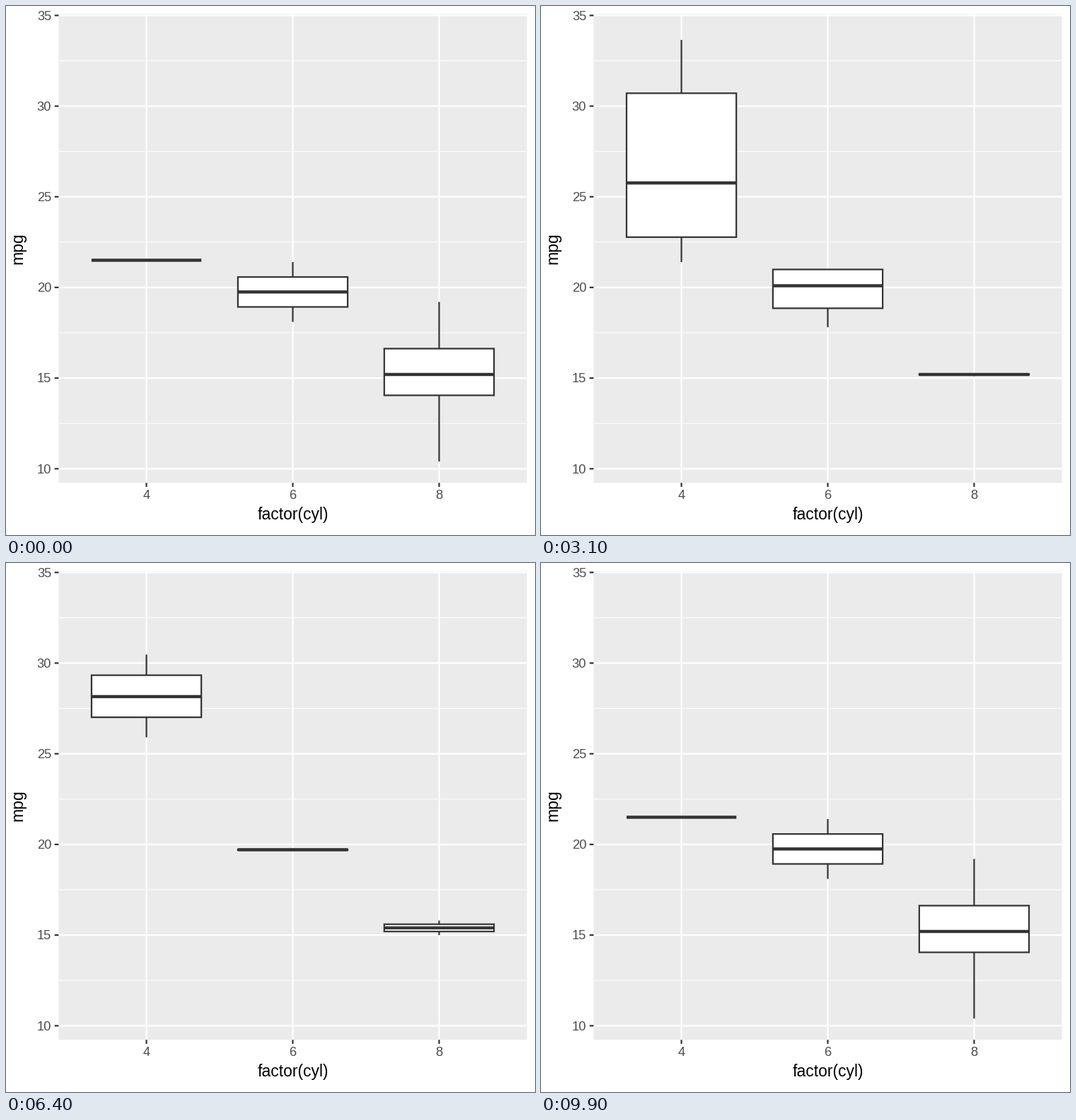
Write a matplotlib script that moves like this. It is 748 by 748 pixels and loops after 10000 ms.

```python
import math

import numpy as np
import matplotlib.pyplot as plt
from matplotlib.animation import FuncAnimation
from matplotlib.patches import Polygon, Rectangle

SIZE, DPI = 748, 136
FRAMES, INTERVAL = 100, 100
LEFT, RIGHT, TOP = 74.4, 736.6, 11.42
Y_MAX, Y_MIN, UNIT = 35.075, 9.225, 25.64
BOTTOM = TOP + (Y_MAX - Y_MIN) * UNIT
STEP = (RIGHT - LEFT) / 3.2
HALF = 0.375 * STEP
LINE = 2.22
TICK = 5.7
INK = "#333333"

# mpg values per gear, one list for each of 4, 6 and 8 cylinders
GEARS = [
    ([21.5],
     [21.4, 18.1],
     [18.7, 14.3, 16.4, 17.3, 15.2, 10.4, 10.4, 14.7, 15.5, 15.2, 13.3, 19.2]),
    ([22.8, 24.4, 22.8, 32.4, 30.4, 33.9, 27.3, 21.4],
     [21.0, 21.0, 19.2, 17.8],
     []),
    ([26.0, 30.4],
     [19.7],
     [15.8, 15.0]),
]
STATES = [[np.percentile(v, [0, 25, 50, 75, 100]) if v else None for v in gear]
          for gear in GEARS]

# Hold and transition schedule: frame -> position in the state cycle
KEY_FRAMES = [0, 11, 33, 45, 55, 66, 78, 99]
KEY_STATES = [0, 0, 1, 1, 1.5, 2, 2, 3]

plt.rcParams["font.family"] = "Liberation Sans"
fig = plt.figure(figsize=(SIZE / DPI, SIZE / DPI), dpi=DPI, facecolor="white")
ax = fig.add_axes([0, 0, 1, 1])
ax.set_xlim(0, SIZE)
ax.set_ylim(SIZE, 0)
ax.axis("off")


def pt(px):
    return px * 72 / DPI


def px_y(value):
    return TOP + (Y_MAX - value) * UNIT


def px_x(index):
    return LEFT + (index + 0.6) * STEP


def line(xs, ys, color, width, z):
    return ax.plot(xs, ys, color=color, lw=pt(width), zorder=z, snap=False,
                   solid_capstyle="butt")[0]


def label(x, y, text, px, color, **kw):
    ax.text(x, y, text, fontsize=pt(px), color=color, va="baseline",
            rotation_mode="anchor", **kw)


def draw_panel():
    ax.add_patch(Rectangle((LEFT, TOP), RIGHT - LEFT, BOTTOM - TOP,
                           fc="#EBEBEB", ec="none", zorder=0, snap=False))
    for value in np.arange(12.5, 35, 5):
        line([LEFT, RIGHT], [px_y(value)] * 2, "white", LINE / 2, 1)
    for value in range(10, 36, 5):
        y = px_y(value)
        line([LEFT, RIGHT], [y, y], "white", LINE, 2)
        line([LEFT - TICK, LEFT], [y, y], INK, LINE, 2)
        label(64.1, y + 6.3, str(value), 18.33, "#4D4D4D", ha="right")
    for i, name in enumerate("468"):
        x = px_x(i)
        line([x, x], [TOP, BOTTOM], "white", LINE, 2)
        line([x, x], [BOTTOM, BOTTOM + TICK], INK, LINE, 2)
        label(x, 697.2, name, 18.33, "#4D4D4D", ha="center")
    label(px_x(1), 726, "factor(cyl)", 22.92, "black", ha="center")
    label(23.7, (TOP + BOTTOM) / 2, "mpg", 22.92, "black", ha="center",
          rotation=90)


class Box:
    def __init__(self, index):
        self.x = px_x(index)
        self.l, self.r = self.x - HALF, self.x + HALF
        self.whiskers = [line([self.x] * 2, [0, 0], INK, LINE, 3)
                         for _ in range(2)]
        self.body = Polygon([(0, 0)] * 4, closed=True, fc="white", ec=INK,
                            lw=pt(LINE), joinstyle="miter", zorder=4,
                            snap=False)
        ax.add_patch(self.body)
        self.median = line([self.l, self.r], [0, 0], INK, 2 * LINE, 5)
        self.parts = [*self.whiskers, self.body, self.median]

    def show(self, stats, alpha):
        for part in self.parts:
            part.set_visible(stats is not None)
        if stats is None:
            return
        low, q1, mid, q3, high = map(px_y, stats)
        for whisker, ys in zip(self.whiskers, ([q3, high], [q1, low])):
            whisker.set_ydata(ys)
            whisker.set_alpha(alpha)
        self.body.set_xy([(self.l, q3), (self.l, q1), (self.r, q1),
                          (self.r, q3)])
        self.body.set_edgecolor((0.2, 0.2, 0.2, alpha))
        self.median.set_ydata([mid, mid])
        # The median is still solid on the first, barely visible step
        self.median.set_alpha(alpha if alpha > 0.01 else 1)


def blend(a, b, u):
    """Stats and line opacity: new boxes fade in, old ones shrink away."""
    if u == 0:
        return a, 1
    e = (1 - math.cos(math.pi * u)) / 2
    if a is None:
        return b, e
    if b is None:
        b = np.full(5, a[2])
    return a + (b - a) * e, 1


draw_panel()
boxes = [Box(i) for i in range(3)]


def update(frame):
    pos = round(float(np.interp(frame, KEY_FRAMES, KEY_STATES)), 6)
    i = int(pos)
    now, after = STATES[i % 3], STATES[(i + 1) % 3]
    for box, a, b in zip(boxes, now, after):
        box.show(*blend(a, b, pos - i))
    return [part for box in boxes for part in box.parts]


anim = FuncAnimation(fig, update, frames=FRAMES, interval=INTERVAL,
                     init_func=lambda: update(0), repeat=True,
                     repeat_delay=0, blit=False)
plt.show()
```
